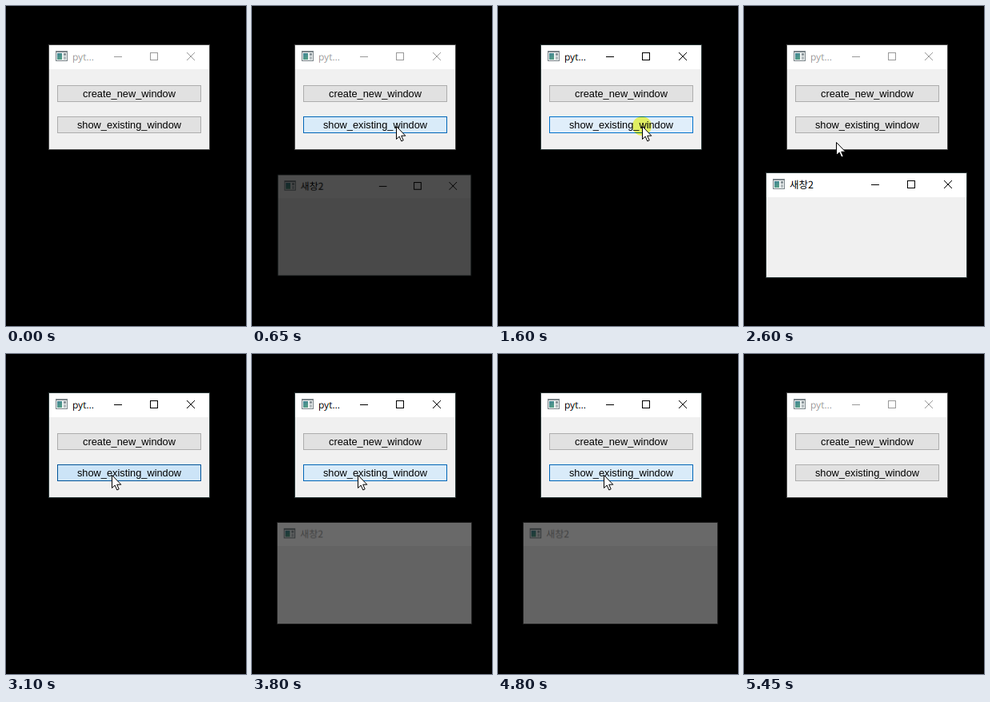
Write an HTML page with a canvas that moves like this. It is 300 px wide and 400 px high and loops after 5550 ms.

```html
<!DOCTYPE html>
<html lang="ko">
<head>
<meta charset="utf-8">
<style>
html, body { margin: 0; width: 100%; height: 100%; overflow: hidden; background: #000; }
canvas { display: block; }
</style>
</head>
<body>
<canvas id="stage" width="300" height="400"></canvas>
<script>
const LOOP = 5550, STEP = 50;
const OPENS = [550, 1600, 3050, 4050];
const CLOSES = [1150, 2750, 3700, 4700];
const CLICKS = [...OPENS, ...CLOSES];

const stage = document.getElementById('stage').getContext('2d');
const layer = document.createElement('canvas');
layer.width = 300;
layer.height = 400;
const layerCtx = layer.getContext('2d');

const MAIN = { x: 54, y: 49, w: 200, h: 130, title: 'pyt...', font: '12px "Open Sans", sans-serif' };
const CHILD = { x: 28, y: 209, w: 250, h: 130, title: '새창2', font: '12.5px "Noto Sans CJK KR", "Noto Sans CJK", sans-serif' };

// time, x, y of the pointer tip
const POINTER = [
  [100, 190, 357], [200, 187, 276], [300, 183, 207], [400, 181, 166], [500, 180, 150],
  [1850, 180, 150], [2050, 165, 183], [2300, 134, 203], [2500, 117, 184],
  [2600, 115, 170], [2700, 132, 151], [4850, 132, 151],
  [4950, 134, 190], [5050, 137, 270], [5150, 140, 369], [5200, 142, 420]
];
const HOVER = [[400, 0], [500, 1], [1850, 1], [1950, 0], [2600, 0], [2700, 1], [4850, 1], [4950, 0]];
const PRESS = [[0, 0.2], [50, 1], [100, 0.5], [150, 0.2], [200, 0]];
const TONES = [
  { fill: [225, 225, 225], edge: [173, 173, 173] },
  { fill: [229, 241, 251], edge: [0, 120, 215] },
  { fill: [204, 228, 247], edge: [0, 84, 153] }
];

const lerp = (a, b, k) => a + (b - a) * k;

function sample(keys, t) {
  if (t <= keys[0][0]) return keys[0].slice(1);
  for (let i = 1; i < keys.length; i++) {
    const a = keys[i - 1], b = keys[i];
    if (t <= b[0]) return a.slice(1).map((v, j) => lerp(v, b[j + 1], (t - a[0]) / (b[0] - a[0])));
  }
  return keys[keys.length - 1].slice(1);
}

function toneColor(tone, part) {
  const i = Math.min(1, Math.floor(tone));
  const mixed = TONES[i][part].map((v, j) => Math.round(lerp(v, TONES[i + 1][part][j], tone - i)));
  return `rgb(${mixed})`;
}

function rect(c, color, x, y, w, h) {
  c.fillStyle = color;
  c.fillRect(x, y, w, h);
}

// Each colour channel is shifted by a third of a pixel, like LCD text.
function lcdText(c, text, x, y, font, v) {
  c.save();
  c.font = font;
  c.textRendering = 'geometricPrecision';
  c.globalCompositeOperation = 'multiply';
  for (const [color, dx] of [[[v, 255, 255], 1 / 3], [[255, v, 255], 0], [[255, 255, v], -1 / 3]]) {
    c.fillStyle = `rgb(${color})`;
    c.fillText(text, x + dx, y);
  }
  c.restore();
}

function appIcon(c, x, y) {
  rect(c, '#7b858a', x, y, 15, 13);
  rect(c, '#eef2f2', x + 1, y + 2, 13, 10);
  const teal = c.createLinearGradient(x, y + 2, x + 6, y + 12);
  teal.addColorStop(0, '#3f7f9b');
  teal.addColorStop(1, '#57a184');
  rect(c, teal, x + 2, y + 3, 6, 8);
  rect(c, '#8a9499', x + 10, y + 3, 3, 3);
  rect(c, '#b4bcbf', x + 10, y + 7, 3, 4);
}

function captionButtons(c, right, y, color) {
  rect(c, color, right - 119, y + 14, 10, 1);
  c.strokeStyle = color;
  c.lineWidth = 1;
  c.strokeRect(right - 73.5, y + 9.5, 9, 9);
  c.beginPath();
  c.moveTo(right - 28, y + 9);
  c.lineTo(right - 18, y + 19);
  c.moveTo(right - 18, y + 9);
  c.lineTo(right - 28, y + 19);
  c.stroke();
}

function drawWindow(c, win, active, captions = true) {
  const { x, y, w, h } = win;
  rect(c, active ? '#2b3838' : '#484848', x - 1, y - 1, w + 2, h + 2);
  rect(c, '#fff', x, y, w, 30);
  rect(c, '#f0f0f0', x, y + 30, w, h - 30);
  appIcon(c, x + 8, y + 7);
  lcdText(c, win.title, x + 29, y + 19, win.font, active ? 0 : 153);
  if (captions) captionButtons(c, x + w, y, active ? '#000' : '#999');
}

function drawButton(label, y, tone) {
  rect(stage, toneColor(tone, 'edge'), 64, y, 180, 21);
  rect(stage, toneColor(tone, 'fill'), 65, y + 1, 178, 19);
  stage.font = '12.8px "Liberation Sans", Arial, sans-serif';
  stage.textAlign = 'center';
  stage.fillStyle = '#000';
  stage.fillText(label, 154, y + 15);
  stage.textAlign = 'left';
}

function drawChild(scale, alpha, active, captions) {
  layerCtx.clearRect(0, 0, 300, 400);
  drawWindow(layerCtx, CHILD, active, captions);
  const cx = CHILD.x + CHILD.w / 2, cy = CHILD.y + CHILD.h / 2;
  stage.save();
  stage.globalAlpha = alpha;
  stage.translate(cx, cy);
  stage.scale(scale, scale);
  stage.drawImage(layer, -cx, -cy);
  stage.restore();
}

function childState(t) {
  for (let i = 0; i < OPENS.length; i++) {
    const shown = t - OPENS[i] - 100, closing = t - CLOSES[i];
    if (shown < 0 || closing >= 150) continue;
    if (closing >= 100) return { scale: 0.969, alpha: 0.41, active: false, captions: false };
    const [scale, alpha] = sample([[0, 0.963, 0.3], [50, 0.985, 0.7], [100, 0.996, 0.94], [150, 1, 1]], shown);
    return { scale, alpha, active: closing < 0, captions: true };
  }
  return null;
}

function mainActive(t) {
  if (t >= 550 && t < 650) return true;
  return CLOSES.some((start, i) => t >= start && t < (i < 3 ? OPENS[i + 1] + 100 : 5450));
}

function buttonTone(t) {
  const click = CLICKS.find(start => t >= start && t <= start + 200);
  return sample(HOVER, t)[0] + (click === undefined ? 0 : sample(PRESS, t - click)[0]);
}

function drawClick(x, y) {
  stage.save();
  stage.globalCompositeOperation = 'multiply';
  stage.fillStyle = 'rgba(255,255,40,0.72)';
  stage.beginPath();
  stage.arc(x, y, 12, 0, Math.PI * 2);
  stage.fill();
  stage.restore();
}

function drawPointer(x, y) {
  const shape = [[0, 0], [0, 16], [3.7, 12.6], [6.3, 18.5], [8.7, 17.4], [6.2, 11.7], [11.3, 11.7]];
  stage.beginPath();
  for (const [dx, dy] of shape) stage.lineTo(x + dx + 0.5, y + dy + 0.5);
  stage.closePath();
  stage.fillStyle = '#fff';
  stage.fill();
  stage.strokeStyle = '#000';
  stage.lineWidth = 1;
  stage.stroke();
}

function draw(t) {
  rect(stage, '#000', 0, 0, 300, 400);
  drawWindow(stage, MAIN, mainActive(t));
  drawButton('create_new_window', 99, 0);
  drawButton('show_existing_window', 138, buttonTone(t));
  const child = childState(t);
  if (child) drawChild(child.scale, child.alpha, child.active, child.captions);
  if (t >= 100 && t < 5200) {
    const [x, y] = sample(POINTER, t).map(Math.round);
    if (CLICKS.includes(t)) drawClick(x, y);
    drawPointer(x, y);
  }
}

const start = performance.now();
function tick() {
  const t = (performance.now() - start) % LOOP;
  draw(Math.floor(t / STEP) * STEP);
  requestAnimationFrame(tick);
}
tick();
</script>
</body>
</html>
```
